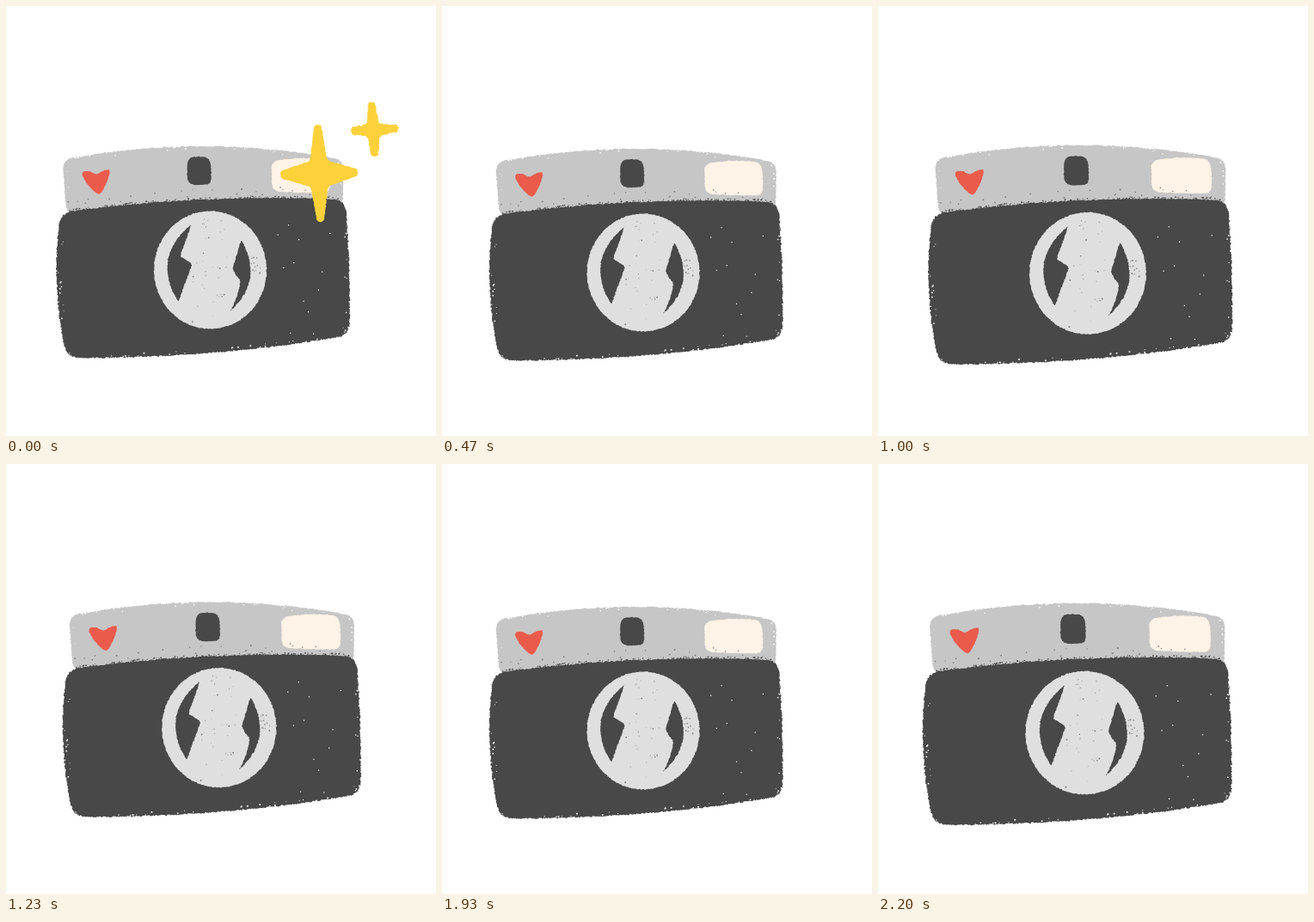
Write an HTML page with a canvas that moves like this. It is 500 px wide and 500 px high and loops after 2410 ms.

```html
<!DOCTYPE html>
<html lang="en">
<head>
<meta charset="utf-8">
<title>Camera</title>
<style>
html, body { margin: 0; width: 100%; height: 100%; overflow: hidden; background: #fff; }
canvas { display: block; width: 500px; height: 500px; }
</style>
</head>
<body>
<canvas id="stage" width="500" height="500"></canvas>
<script>
const ctx = document.getElementById('stage').getContext('2d');
const DARK = '#484848', GREY = '#c6c6c6', PALE = '#dfdfdf', WHITE = '#fff';

function seeded(seed) {
  return () => {
    seed = (seed + 0x6D2B79F5) | 0;
    let t = Math.imul(seed ^ (seed >>> 15), 1 | seed);
    t = (t + Math.imul(t ^ (t >>> 7), 61 | t)) ^ t;
    return ((t ^ (t >>> 14)) >>> 0) / 4294967296;
  };
}
const rnd = seeded(77);
const between = (a, b) => a + (b - a) * rnd();

// Clockwise corners [x, y, bulge of the edge that follows], softened by a moving average
function outline(corners, soft) {
  const raw = [];
  corners.forEach(([x, y, bulge = 0], i) => {
    const [u, v] = corners[(i + 1) % corners.length];
    const dx = u - x, dy = v - y, len = Math.hypot(dx, dy);
    for (let s = 0; s < len; s++) {
      const t = s / len, k = 4 * bulge * t * (1 - t) / len;
      raw.push([x + dx * t + dy * k, y + dy * t - dx * k]);
    }
  });
  const n = raw.length;
  return raw.map((_, i) => {
    let x = 0, y = 0;
    for (let k = -soft; k <= soft; k++) {
      const p = raw[(i + k + n) % n];
      x += p[0];
      y += p[1];
    }
    return [x / (2 * soft + 1), y / (2 * soft + 1)];
  });
}

function ellipse(cx, cy, rx, ry) {
  return Array.from({ length: 360 }, (_, i) => {
    const a = i * Math.PI / 180;
    return [cx + rx * Math.cos(a), cy + ry * Math.sin(a)];
  });
}

// Four blunt arms (up, right, down, left) around a waist
function star(cx, cy, arms, tip, waistX, waistY, tilt) {
  const corners = [];
  arms.forEach((len, i) => {
    const a = tilt + i * Math.PI / 2, c = Math.cos(a), s = Math.sin(a);
    const [w, h] = i % 2 ? [waistY, waistX] : [waistX, waistY];
    for (const [x, y] of [[-tip, -len], [tip, -len], [w, -h]]) {
      corners.push([cx + x * c - y * s, cy + x * s + y * c]);
    }
  });
  return outline(corners, 4);
}

// Chalky edge: each sample wobbles slightly
function rough(points, amount = 0.5) {
  const path = new Path2D();
  for (const [x, y] of points) {
    path.lineTo(x + between(-amount, amount), y + between(-amount, amount));
  }
  path.closePath();
  return path;
}

const top_ = outline([[62, 182, 16], [389, 182, 0], [388, 238, 0], [67, 245, 0]], 12);
const body = outline([[60, 243, 7.5], [391, 228, 2], [396, 386, 7.5], [67, 412, 8]], 16);
const ring = ellipse(234, 310, 65.5, 68.5);
const leftGap = outline([[212, 257], [199, 294], [213, 303], [197, 347, 20]], 2);
const rightGap = outline([[270, 275, 17], [257, 358, -2], [269, 322, 1], [260, 308]], 2);
const finder = outline([[208, 179, 1], [233, 179, 1], [235, 210, 1], [208, 210, 1]], 7);
const flash = outline([[305, 184, 3], [371, 182, 1], [373, 220, 1], [306, 218, 0]], 9);
const heart = outline([[102, 200, 2], [118, 193, 2], [105, 223, 3], [84, 196, 3]], 4);

const parts = [
  [rough(top_, 0.7), GREY],
  [rough(body, 0.8), DARK],
  [rough(ring), PALE],
  [rough(leftGap), DARK],
  [rough(rightGap), DARK],
  [rough(finder), DARK],
  [rough(flash), '#fff2e6'],
  [rough(heart), '#ea5b4c']
];
const sparkles = [
  rough(star(364, 195, [57, 45, 56, 45], 4, 10, 15, -0.03)),
  rough(star(427, 144, [32, 29, 31, 26], 4, 7, 7, -0.06), 0.8)
];

// Missing or stray chalk: [x, y, size, colour]
const specks = [];
const speck = (x, y, color, size = between(0.8, 1.7)) => specks.push([x, y, size, color]);

function crumbs(line, chance) {
  for (const [x, y] of line) {
    if (rnd() > chance) continue;
    const pull = 0.04 * rnd() ** 2;
    speck(x + (225 - x) * pull, y + (300 - y) * pull, WHITE);
  }
}
crumbs(top_.filter(p => p[1] < 230), 0.05);
crumbs(body.filter(p => p[1] > 250), 0.1);

for (const [x, y] of body) {
  if (y > 243 || x > 384) continue;
  if (rnd() < 0.25) speck(x, y - 2 * rnd(), DARK);
  if (rnd() < 0.1) speck(x, y - 14 * rnd() ** 2, '#777');
}
for (let i = 0; i < 12; i++) speck(between(310, 388), between(250, 385), WHITE, 1.2);
for (let i = 0; i < 35; i++) {
  const y = between(250, 372);
  speck(between(215, 255) + (310 - y) * 0.15, y, i % 3 ? '#b5b5b5' : '#777');
}
for (let i = 0; i < 16; i++) speck(between(282, 292), between(293, 315), '#888');

// Each pose: scale and shift in x, then in y
const poses = {
  flash: [1, 3.5, 1, -3],
  rest: [1, 0, 1, 0],
  near: [1.053, -6, 1.047, -12],
  shift: [1.036, 1.5, 1.035, -10],
  right: [1.016, 10, 1.015, -8]
};
const timeline = [
  [470, 'flash'], [770, 'rest'], [1000, 'near'], [1230, 'shift'],
  [1430, 'right'], [1930, 'flash'], [2200, 'rest'], [2410, 'near']
];
const LOOP = 2410;

function fill(path, color) {
  ctx.fillStyle = color;
  ctx.fill(path);
}

function draw(name) {
  const [sx, dx, sy, dy] = poses[name];
  ctx.resetTransform();
  ctx.clearRect(0, 0, 500, 500);
  ctx.setTransform(sx, 0, 0, sy, dx, dy);
  for (const [path, color] of parts) fill(path, color);
  for (const [x, y, size, color] of specks) {
    ctx.fillStyle = color;
    ctx.fillRect(x - size / 2, y - size / 2, size, size);
  }
  if (name !== 'flash') return;
  ctx.resetTransform();
  for (const path of sparkles) fill(path, '#fdd13a');
}

const start = performance.now();
let shown = '';
function tick() {
  const t = (performance.now() - start) % LOOP;
  const name = timeline.find(([end]) => t < end)[1];
  if (name !== shown) draw(shown = name);
  requestAnimationFrame(tick);
}
tick();
</script>
</body>
</html>
```
